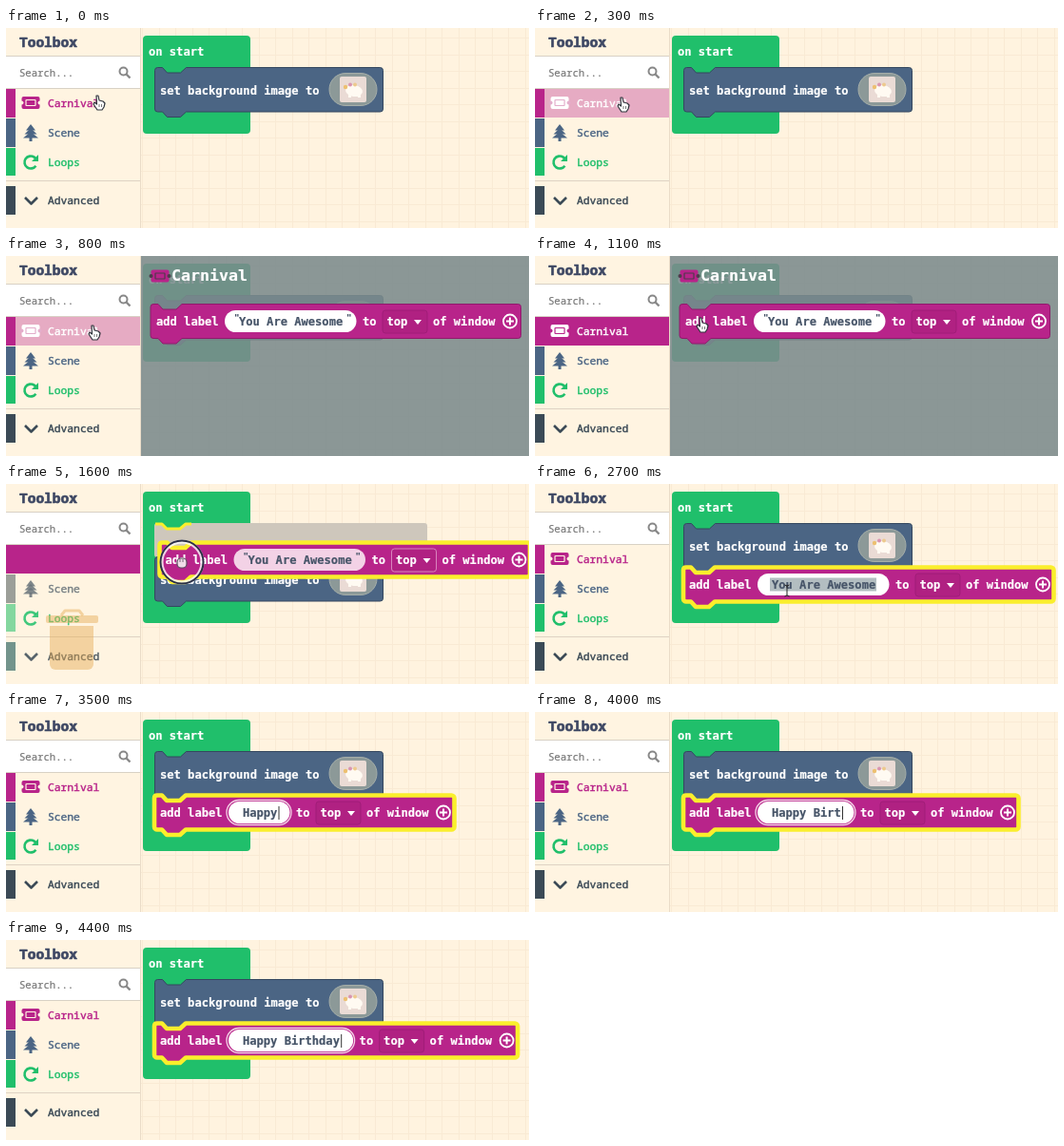
Recreate the animation shown at these times as an HTML page with a canvas. Size 550 by 210 pixels, loop 6.4 s.

```html
<!DOCTYPE html>
<html lang="en">
<head>
<meta charset="utf-8">
<title>Block editor</title>
<style>
html, body { margin: 0; width: 100%; height: 100%; overflow: hidden; background: #fff3df; }
canvas { display: block; width: 100vw; height: 100vh; }
</style>
</head>
<body>
<canvas id="stage"></canvas>
<script>
const W = 550, H = 210, LOOP = 6400, STEP = 100;
const MAGENTA = '#b8248a', SLATE = '#4b6584', GREEN = '#20bf6b', DARK = '#3b4a56';
const CREAM = '#fff4e1', YELLOW = '#faee2c', INK = '#3d4763';
const MONO = '"DejaVu Sans Mono", monospace', MENU = '"Noto Sans Mono", "DejaVu Sans Mono", monospace';
const SLOT = { x: 156, y: 41, setHeight: 47, addHeight: 36 };

const canvas = document.getElementById('stage');
const c = canvas.getContext('2d');
const scale = window.devicePixelRatio || 1;
canvas.width = W * scale;
canvas.height = H * scale;

function rect(x, y, w, h, color) {
  c.fillStyle = color;
  c.fillRect(x, y, w, h);
}

function round(x, y, w, h, r, fill, stroke, line = 1) {
  c.beginPath();
  c.roundRect(x, y, w, h, r);
  paint(fill, stroke, line);
}

function circle(x, y, r, fill, stroke, line = 1) {
  c.beginPath();
  c.arc(x, y, r, 0, Math.PI * 2);
  paint(fill, stroke, line);
}

function poly(points, fill, stroke, line = 1) {
  c.beginPath();
  points.forEach(([x, y]) => c.lineTo(x, y));
  if (fill) c.closePath();
  paint(fill, stroke, line);
}

function paint(fill, stroke, line) {
  if (fill) { c.fillStyle = fill; c.fill(); }
  if (stroke) { c.strokeStyle = stroke; c.lineWidth = line; c.stroke(); }
}

// y is the vertical centre of the line
function text(str, x, y, color, size = 12.1, weight = 'bold', family = MONO, extra = 0.2) {
  c.font = `${weight} ${size}px ${family}`;
  c.fillStyle = c.strokeStyle = color;
  c.lineWidth = extra;
  c.fillText(str, x, y + size * 0.36);
  c.strokeText(str, x, y + size * 0.36);
}

// Linear motion through [time, x, y] keys
function track(keys, t) {
  const i = keys.findIndex(k => k[0] > t);
  if (i < 0) return keys[keys.length - 1].slice(1);
  if (i === 0) return keys[0].slice(1);
  const a = keys[i - 1], b = keys[i], p = (t - a[0]) / (b[0] - a[0]);
  return [a[1] + (b[1] - a[1]) * p, a[2] + (b[2] - a[2]) * p];
}

function blockShape(x, y, w, h, fill, stroke, line = 1) {
  const notch = [[8, 0], [13, 5.5], [27, 5.5], [33, 0]];
  c.beginPath();
  c.moveTo(x, y + 3);
  c.quadraticCurveTo(x, y, x + 3, y);
  notch.forEach(([nx, ny]) => c.lineTo(x + nx, y + ny));
  c.arcTo(x + w, y, x + w, y + h, 3);
  c.arcTo(x + w, y + h, x, y + h, 3);
  notch.reverse().forEach(([nx, ny]) => c.lineTo(x + nx, y + h + ny));
  c.arcTo(x, y + h, x, y, 3);
  c.closePath();
  c.lineJoin = 'round';
  paint(fill, stroke, line);
}

function ticket(x, y, color, back) {
  round(x, y, 19, 13, 2, color);
  circle(x, y + 6.5, 2, back);
  circle(x + 19, y + 6.5, 2, back);
  round(x + 4.5, y + 3.5, 10, 6, 0.5, null, back, 1.2);
}

function tree(color) {
  [[101, 5], [105, 6.5], [109, 8]].forEach(([y, half]) =>
    poly([[26, y], [26 + half, y + 6.5], [26 - half, y + 6.5]], color));
  rect(24.5, 114, 3, 5, color);
}

function loopArrow(color) {
  c.beginPath();
  c.arc(26, 141, 6.5, 0.6, Math.PI * 1.8);
  paint(null, color, 2.6);
  poly([[34, 133], [34, 140], [27, 140]], color);
}

function workspace() {
  rect(0, 0, W, H, '#fff3df');
  for (let x = 143; x < W; x += 17.5) rect(Math.round(x), 0, 1, H, '#f9ead4');
  for (let y = 10; y < H; y += 17.5) rect(142, Math.round(y), W, 1, '#f9ead4');
}

function setBlock(y) {
  const x = SLOT.x;
  blockShape(x + 0.5, y + 0.5, 240, 46.5, SLATE, '#34475f');
  text('set background image to', x + 6, y + 24.5, '#fff');
  round(x + 184, y + 6.5, 50, 34, 17, '#8c9998', '#a5aea9');
  round(x + 195, y + 10, 28, 27, 2, '#eadbd5');
  c.beginPath();
  c.ellipse(x + 210, y + 25, 9, 6, 0.15, 0, Math.PI * 2);
  paint('#fffaf2');
  rect(x + 204, y + 28, 3, 4, '#fffaf2');
  rect(x + 214, y + 28, 3, 4, '#fffaf2');
  circle(x + 201, y + 21, 2.2, '#edc070');
  circle(x + 206, y + 18.5, 2, '#d994b0');
  circle(x + 211, y + 18.5, 2, '#edc98d');
}

function addBlock(x, y, label, { outlined, dragging, selected, editing, quoted } = {}) {
  const mid = y + 18.5, field = x + 78, fieldWidth = Math.max(38, 28 + 7.4 * label.length);
  const end = field + fieldWidth;
  blockShape(x, y, end + 172.5 - x, SLOT.addHeight, MAGENTA, outlined ? YELLOW : '#8f1a6b', outlined ? 4.6 : 1);
  text('add label', x + 6, mid, '#fff');

  if (editing) round(field - 2, mid - 13.5, fieldWidth + 3, 26, 13, null, '#f3d3e6', 1.3);
  round(field, mid - 12, fieldWidth - 0.5, 23, 11.5, dragging ? '#f3d2e6' : '#fff');
  if (selected) rect(field + 13, mid - 7.5, 7.27 * label.length + 3, 14, '#b3bec1');
  text(label, field + 15, mid, '#465468');
  if (quoted) {
    text('"', field + 10, mid - 4, '#465468', 9);
    text('"', end - 11, mid - 4, '#465468', 9);
  }
  if (editing && !selected) rect(field + 16 + 7.3 * label.length, mid - 7, 1, 14, '#333');

  text('to', end + 6, mid, '#fff');
  round(end + 27, mid - 12, 47, 24, 3, '#b02182', dragging ? '#d884bd' : '#a01d78');
  text('top', end + 31.5, mid, '#fff');
  poly([[end + 60, mid - 2], [end + 68, mid - 2], [end + 64, mid + 3]], '#fff');
  text('of window', end + 80, mid, '#fff');
  circle(end + 161, mid - 0.5, 7, null, '#fff', 1.8);
  rect(end + 157, mid - 1.5, 8, 2, '#fff');
  rect(end + 160, mid - 4.5, 2, 8, '#fff');
}

function menuLabel(str, y, color) {
  text(str, 44, y, color, 11.3, '500', MENU, 0.45);
}

function toolbox(t) {
  const hover = t < 1600 ? Math.min(1, Math.max(0, t / 300)) : 0;
  const solid = t >= 900 && t <= 1600;
  const dragging = t >= 1600 && t < 2100;
  rect(0, 0, 141, H, CREAM);
  rect(141, 0, 1, H, '#eadcc8');
  text('Toolbox', 14, 14.5, INK, 14.5, 'bold', MENU, 0.6);
  rect(0, 29, 141, 35, '#d8d1c5');
  rect(0, 30, 141, 33, '#fff');
  text('Search...', 14, 47, '#777', 10.6, 'normal', MENU);
  circle(123.5, 45.5, 4, null, '#888', 2);
  poly([[126.5, 48.5], [130.5, 52.5]], null, '#888', 2.4);

  if (hover || solid) {
    c.globalAlpha = solid ? 1 : 0.35 * hover;
    rect(0, 64, 141, 30, MAGENTA);
  }
  c.globalAlpha = 1;
  rect(0, 64, 10, 30, MAGENTA);

  c.globalAlpha = dragging ? 0.55 : 1;
  rect(0, 95, 10, 30, dragging ? '#4b5a5f' : SLATE);
  rect(0, 126, 10, 29, GREEN);
  c.globalAlpha = dragging ? 0.75 : 1;
  rect(0, 166, 10, 30, dragging ? '#457570' : DARK);

  c.globalAlpha = dragging ? 0.85 : 1;
  if (t !== 1600) {
    const color = hover > 0.3 ? '#fff' : MAGENTA;
    ticket(16.5, 72, color, solid ? MAGENTA : hover ? '#e3aecb' : CREAM);
    menuLabel('Carnival', 79, color);
  }
  const sceneColor = dragging ? '#69737a' : SLATE;
  tree(sceneColor);
  menuLabel('Scene', 110, sceneColor);
  loopArrow(GREEN);
  menuLabel('Loops', 141, GREEN);
  poly([[20, 178], [26.5, 184.5], [33, 178]], null, DARK, 2.6);
  menuLabel('Advanced', 181, DARK);
  c.globalAlpha = 1;
  rect(0, 160, 141, 1, '#ddd2c3');
}

function trash(alpha) {
  const color = '#e4a850';
  c.globalAlpha = alpha;
  poly([[58, 138], [62, 133], [77, 133], [81, 138]], null, color, 3);
  round(42, 138, 55, 8, 2, color);
  round(46, 149, 46, 46, [0, 0, 6, 6], color);
  c.globalAlpha = 1;
}

function flyout() {
  rect(142, 0, W, H, 'rgba(123,139,140,.88)');
  ticket(152.5, 14.5, MAGENTA, '#4e3a4c');
  text('Carnival', 174, 20, '#fff', 16.6);
  addBlock(152, 50.5, 'You Are Awesome', { quoted: true });
}

function hand(x, y) {
  poly([[-3, -7], [-1, -7], [0, -2], [4, -1], [6, 1], [5, 5], [3, 8], [-2, 8], [-6, 2], [-5, 0], [-2.5, 2]]
    .map(([dx, dy]) => [x + dx, y + dy]), '#fff', '#30343c', 1.2);
  [0, 2.5].forEach(dx => poly([[x + dx, y + 2], [x + dx, y + 5]], null, '#555', 0.8));
}

function fist(x, y) {
  round(x - 5, y - 4, 10, 10, 4, '#f0dce8', '#5a4a5c', 1.2);
  [-2, 1].forEach(dx => poly([[x + dx, y - 3], [x + dx, y]], null, '#5a4a5c', 0.8));
}

function textCursor(x, y) {
  poly([[x - 2.5, y - 6], [x, y - 5], [x + 2.5, y - 6]], null, '#222');
  poly([[x, y - 5], [x, y + 5]], null, '#222');
  poly([[x - 2.5, y + 6], [x, y + 5], [x + 2.5, y + 6]], null, '#222');
}

function pressRing(x, y) {
  circle(x, y, 21.5, null, 'rgba(255,255,255,.8)', 4);
  circle(x, y, 22.5, null, '#2b2f45', 2);
}

function pointer(t) {
  if (t >= 3100) return;
  const [x, y] = track([[0, 98, 78], [300, 93, 80], [800, 93, 80], [1100, 176, 72],
    [1500, 176, 72], [1600, 185, 82], [1900, 178, 112], [2200, 265, 112]], t);
  if (t >= 2200) return textCursor(x, y);
  if (t < 1600 || t >= 2000) return hand(x, y);
  pressRing(x, y);
  fist(x, y);
}

function draw(t) {
  const dragging = t >= 1600 && t < 2000;
  const above = t >= 1600 && t < 1800;
  const below = SLOT.y + SLOT.setHeight;

  c.setTransform(canvas.width / W, 0, 0, canvas.height / H, 0, 0);
  workspace();
  round(144, 8, 113, t >= 1600 ? 138 : 103, 4, GREEN);
  text('on start', 150, 25, '#fff');

  if (dragging) {
    const y = above ? SLOT.y : below;
    blockShape(SLOT.x, y, 287, SLOT.addHeight, '#cec7bc');
    poly([[157, y + 1], [164, y + 1], [169, y + 6], [183, y + 6], [189, y + 1], [195, y + 1]], null, YELLOW, 3);
  }
  setBlock(above ? SLOT.y + 35 : SLOT.y);

  if (dragging) {
    const [x, y] = track([[1600, 161.5, 61.5], [1900, 157, 92.5]], t);
    addBlock(x, y, 'You Are Awesome', { outlined: true, dragging: true, quoted: true });
  } else if (t >= 2000) {
    const typed = Math.max(0, (t - 3000) / STEP);
    const label = typed ? 'Happy Birthday'.slice(0, typed) : 'You Are Awesome';
    addBlock(SLOT.x, 87.5, label, {
      outlined: true,
      quoted: t < 2700,
      selected: t >= 2700 && !typed,
      editing: t >= 2800
    });
  }

  if (t >= 800 && t < 1600) flyout();
  toolbox(t);
  if (t >= 1600 && t < 2200) trash(t < 2000 ? 0.45 : 0.45 * (2200 - t) / 300);
  pointer(t);
}

const start = performance.now();
function frame() {
  const t = (performance.now() - start) % LOOP;
  draw(Math.floor(t / STEP) * STEP);
  requestAnimationFrame(frame);
}
frame();
</script>
</body>
</html>
```
